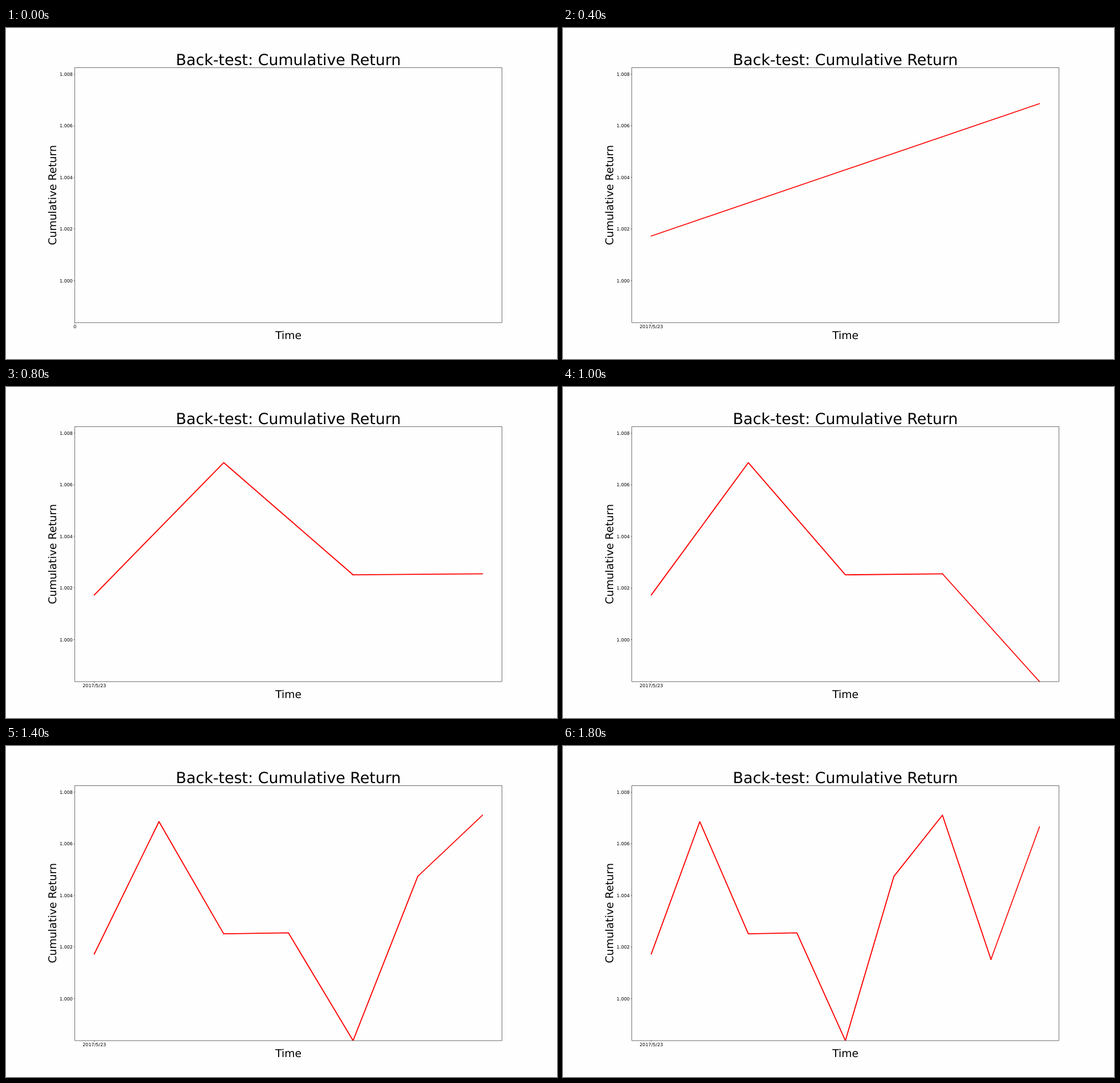
An HTML page that plays this animation: 966 px wide and 580 px high, repeating every 2000 ms.

```html
<!DOCTYPE html>
<html lang="en">
<head>
<meta charset="utf-8">
<title>Back-test: Cumulative Return</title>
<style>
  html, body { margin: 0; width: 100%; height: 100%; overflow: hidden; background: #fefefe; }
  svg { display: block; }
  text { font: 8.05px "DejaVu Sans", sans-serif; text-rendering: geometricPrecision; text-anchor: middle; }
  .title { font-size: 26.83px; }
  .label { font-size: 18.78px; }
  .ytick { text-anchor: end; }
  .axis { fill: none; stroke: #000; stroke-width: .56; }
  .line { fill: none; stroke: #f00; stroke-linecap: square; stroke-linejoin: round; }
</style>
</head>
<body>
<svg width="966" height="580" viewBox="0 0 966 580">
  <clipPath id="plot"><rect x="120.75" y="69.6" width="748.65" height="446.6"/></clipPath>
  <g clip-path="url(#plot)">
    <path class="line" id="past" stroke-width="1.85"/>
    <path class="line" id="latest" stroke-width="1.61"/>
  </g>
  <rect class="axis" x="120.75" y="69.6" width="748.65" height="446.6"/>
  <g id="yticks"></g>
  <g id="xtick">
    <path class="axis" d="M0 516.2v1.9"/>
    <text y="526.1"></text>
  </g>
  <text class="title" x="495.1" y="65.2">Back-test: Cumulative Return</text>
  <text class="label" x="495.1" y="544.5">Time</text>
  <text class="label" transform="translate(88 292.9) rotate(-90)">Cumulative Return</text>
</svg>
<script>
const STEP = 200, STEPS = 10;
const LEFT = 154.78, RIGHT = 835.37, MID = (LEFT + RIGHT) / 2, AXIS = 120.75;
const returns = [1.00173, 1.00686, 1.00251, 1.00255, 0.99837, 1.00474, 1.00711, 1.00152, 1.00666];

const find = id => document.getElementById(id);
const yOf = value => 442.6 - (value - 1) * 45200;

let ticks = "";
for (let i = 0; i < 5; i++) {
  const value = 1 + i * 0.002, y = yOf(value);
  ticks += `<path class="axis" d="M${AXIS} ${y}h-1.9"/>` +
    `<text class="ytick" x="117" y="${y + 2.9}">${value.toFixed(3)}</text>`;
}
find("yticks").innerHTML = ticks;

const toPath = points => points.length > 1 ? "M" + points.join("L") : "";

// The x axis is rescaled to the number of points at every step.
function draw(count) {
  const gap = (RIGHT - LEFT) / Math.max(1, count - 1);
  const points = returns.slice(0, count).map((v, i) => [LEFT + i * gap, yOf(v)]);
  find("past").setAttribute("d", toPath(points.slice(0, -1)));
  find("latest").setAttribute("d", toPath(points.slice(-2)));

  const x = count === 0 ? AXIS : count === 1 ? MID : LEFT;
  find("xtick").setAttribute("transform", `translate(${x} 0)`);
  find("xtick").querySelector("text").textContent = count ? "2017/5/23" : "0";
}

let shown = -1;
const start = performance.now();
function tick(now) {
  const count = Math.floor(Math.max(0, now - start) / STEP) % STEPS;
  if (count !== shown) draw(shown = count);
  requestAnimationFrame(tick);
}
tick(start);
</script>
</body>
</html>
```
